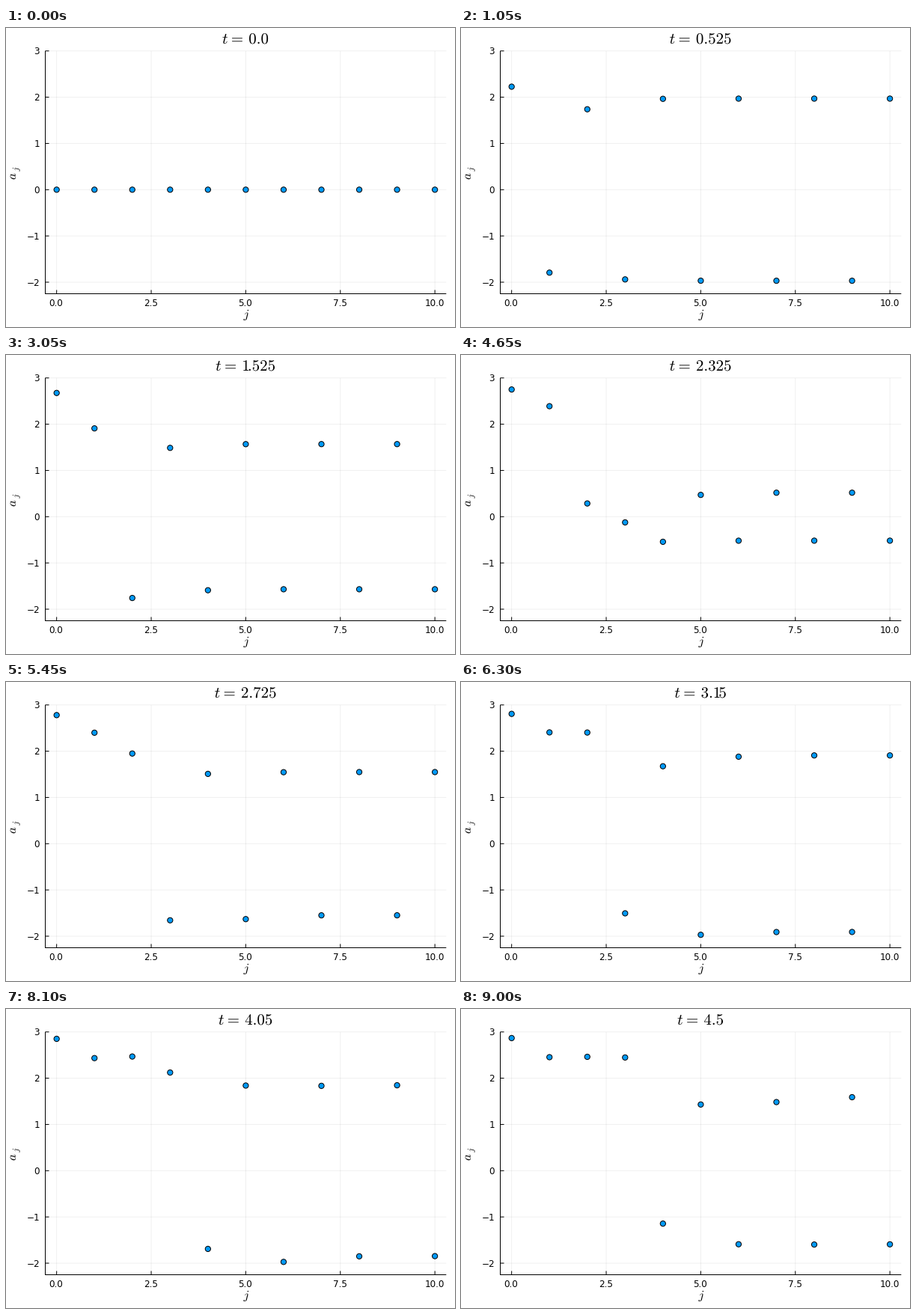
These frames come from a looping animation (600 by 400 pixels, 9050 ms). A matplotlib script:

```python
import numpy as np
import matplotlib.pyplot as plt
from matplotlib.animation import FuncAnimation
from matplotlib.patches import Circle, PathPatch
from matplotlib.path import Path
from matplotlib.textpath import TextPath
from matplotlib.transforms import Affine2D

plt.rcParams["mathtext.fontset"] = "cm"
plt.rcParams["font.family"] = "DejaVu Sans"
plt.rcParams["path.snap"] = False

W, H, DPI = 600, 400, 100
PX = 72 / DPI                      # one pixel in points
LEFT, RIGHT, TOP, BOTTOM = 52.5, 588.3, 30.7, 355.5
FRAMES, STEP, COUNT = 181, 0.025, 11


def sx(j):
    return LEFT + (j + 0.3) / 10.6 * (RIGHT - LEFT)


def sy(a):
    return BOTTOM - (a + 2.25) / 5.25 * (BOTTOM - TOP)


# Gauss-Chebyshev nodes on [-3, -2] and [2, 3]
half = 2.5 + 0.5 * np.cos((np.arange(80) + 0.5) * np.pi / 80)
nodes = np.concatenate([-half, half])


def coefficients(t):
    """Diagonal recurrence coefficients for the weight exp(t x) on both bands."""
    q = np.exp(t * (nodes - 3) / 2)
    q /= np.linalg.norm(q)
    basis, diag = [], []
    for _ in range(COUNT):
        basis.append(q)
        r = nodes * q
        diag.append(q @ r)
        for _ in range(2):
            for p in basis:
                r = r - (p @ r) * p
        q = r / np.linalg.norm(r)
    return np.array(diag)


fig = plt.figure(figsize=(W / DPI, H / DPI), dpi=DPI, facecolor="white")
ax = fig.add_axes([0, 0, 1, 1])
ax.set_xlim(0, W)
ax.set_ylim(H, 0)
ax.axis("off")


def line(x0, y0, x1, y1, alpha=1):
    ax.plot([x0, x1], [y0, y1], color="black", lw=PX, alpha=alpha,
            solid_capstyle="butt")


def label(x, y, s, align):
    ax.text(x, y, s, fontsize=12 * PX, color="black", ha=align, va="baseline")


# Math text is drawn as unhinted outlines, one glyph at a time
UNIT = 100
ADVANCE = {"t": 0.39, "=": 1.295, ".": 0.278, "1": 0.36}   # in em
glyphs = {c: TextPath((0, 0), f"${c}$", size=UNIT) for c in "tj=a.0123456789"}


def formula(text, size):
    x, parts = 0, []
    for c in text:
        move = Affine2D().translate(x * UNIT, 0).scale(size / UNIT, -size / UNIT)
        parts.append(glyphs[c].transformed(move))
        x += ADVANCE.get(c, 0.5)
    return Path.make_compound_path(*parts)


def centred(path, x, y):
    box = path.get_extents()
    return path.transformed(Affine2D().translate(x - (box.x0 + box.x1) / 2, y))


def upright(path, x, y):
    return path.transformed(Affine2D().rotate_deg(-90).translate(x, y))


def ink(path):
    return ax.add_patch(PathPatch(path, facecolor="black", linewidth=0))


for v in (0, 2.5, 5, 7.5, 10):
    x = sx(v)
    line(x, TOP, x, BOTTOM, alpha=0.06)
    line(x, BOTTOM, x, BOTTOM - 5)
    label(x - 0.6, 371.5, f"{v:.1f}", "center")

for v in range(-2, 4):
    y = sy(v)
    line(LEFT, y, RIGHT, y, alpha=0.06)
    line(LEFT, y, LEFT + 5, y)
    label(45, y + 4.5, str(v).replace("-", "\u2212"), "right")

line(LEFT, TOP, LEFT, BOTTOM + 0.5)
line(LEFT, BOTTOM, RIGHT, BOTTOM)

ink(centred(formula("j", 16.5), 320.7, 388))
ink(upright(formula("a", 16.5), 13, 203))
ink(upright(formula("j", 11.5), 16.5, 191.5))
title = ink(formula("t", 20.9))

dots = [ax.add_patch(Circle((sx(j), sy(0)), 3.6, facecolor="#009af9",
                            edgecolor="black", linewidth=PX, zorder=5))
        for j in range(COUNT)]


def update(i):
    t = round(i * STEP, 3)
    title.set_path(centred(formula(f"t={t}", 20.9), 319.8, 21))
    for j, a in enumerate(coefficients(t)):
        dots[j].center = sx(j), sy(a)
    return [title, *dots]


anim = FuncAnimation(fig, update, frames=FRAMES, interval=50, repeat=True,
                     repeat_delay=0, blit=False)
plt.show()
```
